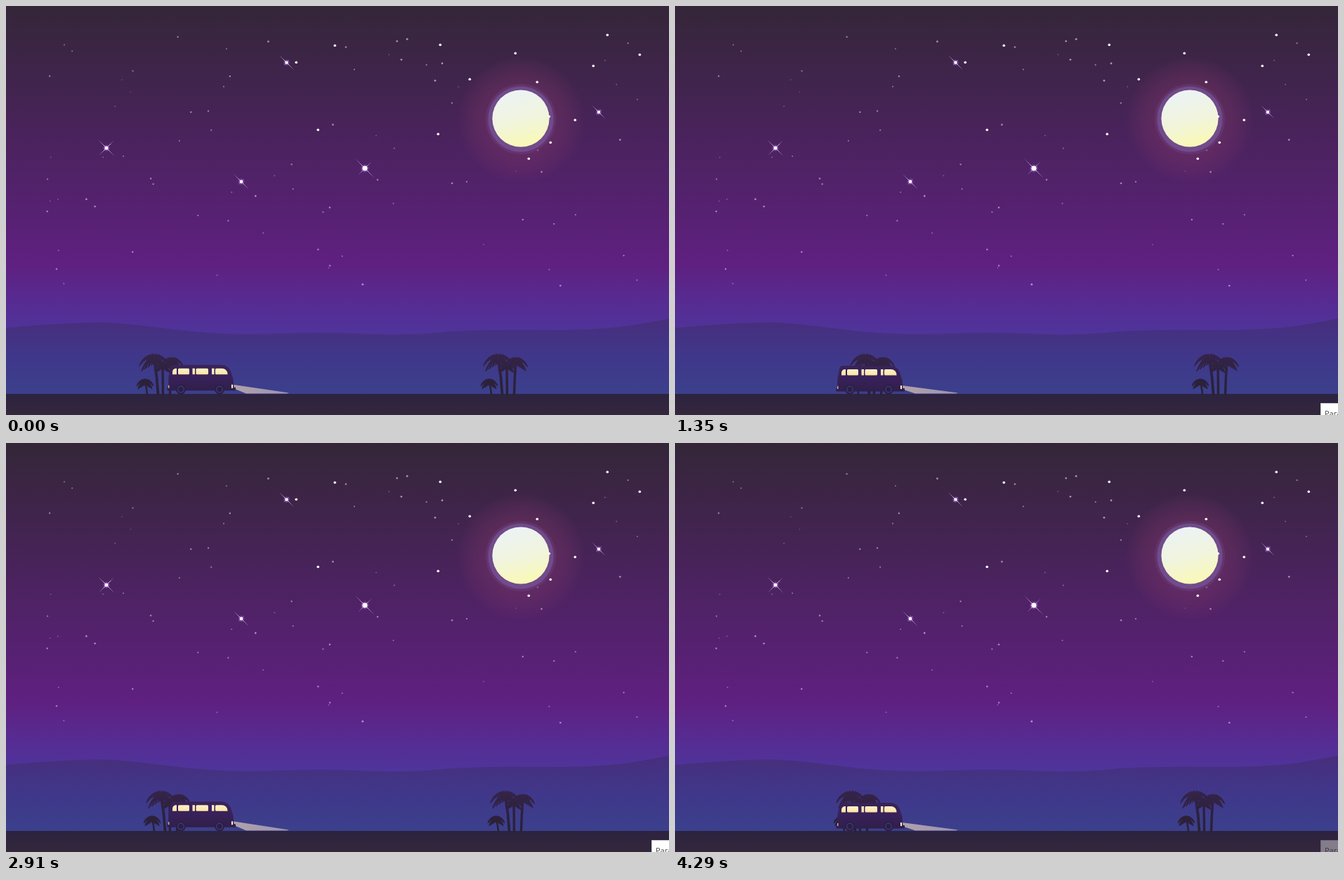
These frames come from a looping animation (944x582 px, 4370 ms). An HTML page with a canvas:

```html
<!DOCTYPE html>
<html lang="en">
<head>
<meta charset="utf-8">
<title>Night drive</title>
<style>
html, body { margin: 0; width: 100%; height: 100%; overflow: hidden; background: #30253d; }
#scene { position: relative; width: 100%; height: 100%; overflow: hidden; contain: strict; }
canvas { display: block; }
#tip {
  position: absolute; left: 919px; top: 565px; right: 0; bottom: 0; overflow: hidden;
  box-sizing: border-box; padding: 6px 0 0 5px; visibility: hidden;
  background: #fff; border: solid #d0d0d0; border-width: 1px 0 0 1px; color: #4a4a4a;
  font: 11px/16px "Open Sans", "Noto Sans", sans-serif;
}
</style>
</head>
<body>
<div id="scene">
  <canvas id="stage" width="944" height="582"></canvas>
  <div id="tip">Parar</div>
</div>
<script>
const W = 944, H = 582, ROAD = 552;
const LOOP = 4370, GAP = 490, SPEED = 1 / 3;

// Times at which the picture changes, on a 10 ms clock
const ramp = (from, to, count) => Array.from({ length: count },
  (_, i) => Math.ceil((from + (to - from) * (i + 1) / count) / 10) * 10);
const steps = [0, 70, ...ramp(70, 590, 7), ...ramp(590, 4290, 48)];

const bright = [[468, 56], [413, 80], [618, 55], [725, 67], [856, 41], [902, 69], [836, 85],
  [660, 104], [756, 108], [810, 162], [775, 194], [744, 217], [615, 182], [444, 176], [773, 157]];
const hill = [[0, 458], [120, 448], [190, 454], [260, 463], [330, 468], [450, 464],
  [570, 469], [665, 460], [850, 462], [950, 444]];

function layer(w, h, paint) {
  const c = document.createElement('canvas');
  c.width = w;
  c.height = h;
  paint(c.getContext('2d'));
  return c;
}

function randomizer(seed) {
  return () => (seed = seed * 16807 % 2147483647) / 2147483647;
}

// Linear gradient between two points, colours evenly spaced
function blend(g, x0, y0, x1, y1, ...colours) {
  const grad = g.createLinearGradient(x0, y0, x1, y1);
  colours.forEach((c, i) => grad.addColorStop(i / (colours.length - 1), c));
  return grad;
}

function disc(g, x, y, r, fill) {
  g.fillStyle = fill;
  g.beginPath();
  g.arc(x, y, r, 0, 7);
  g.fill();
}

function box(g, x, y, w, h, radii, fill) {
  g.fillStyle = fill;
  g.beginPath();
  g.roundRect(x, y, w, h, radii);
  g.fill();
}

function sparkle(g, x, y, size, cross, core) {
  const ray = (len, dy) => {
    const ends = [x - len, y - len * dy, x + len, y + len * dy];
    g.strokeStyle = blend(g, ...ends, 'rgba(180,120,220,.2)', '#fff', 'rgba(180,120,220,.2)');
    g.lineWidth = 1;
    g.beginPath();
    g.moveTo(ends[0], ends[1]);
    g.lineTo(ends[2], ends[3]);
    g.stroke();
  };
  disc(g, x, y, core + 2, 'rgba(150,80,200,.5)');
  ray(size, 1);
  ray(cross, -1);
  disc(g, x, y, core, '#fff');
}

function drawStars(g) {
  const rnd = randomizer(77);
  for (let i = 0; i < 86; i++) {
    const glow = rnd();
    disc(g, 55 + rnd() * 855, 40 + rnd() * 358, .8 + glow * .6, `rgba(210,182,220,${.35 + glow * .4})`);
  }
}

function drawMoon(g) {
  const halo = g.createRadialGradient(733, 162, 40, 733, 162, 91);
  for (let p = 0; p <= 1; p += .125) halo.addColorStop(p, `rgba(125,52,102,${.44 * (1 - p ** 1.6)})`);
  disc(g, 733, 162, 91, halo);
  disc(g, 733, 161, 50, 'rgba(115,80,150,.25)');
  disc(g, 733, 161, 46.5, 'rgba(125,95,165,.55)');
  disc(g, 733, 160, 40.6, blend(g, 722, 120, 742, 201, '#ecf3f5', '#f0f4de', '#faf9b4'));
}

function drawHills(g) {
  g.beginPath();
  g.moveTo(...hill[0]);
  for (let i = 1; i < hill.length - 1; i++) {
    const [x, y] = hill[i], [nx, ny] = hill[i + 1];
    g.quadraticCurveTo(x, y, (x + nx) / 2, (y + ny) / 2);
  }
  g.lineTo(...hill.at(-1));
  g.lineTo(W, ROAD);
  g.lineTo(0, ROAD);
  g.fillStyle = blend(g, 0, 446, 0, ROAD, '#472e7c', '#40378a', '#3b408c');
  g.fill();
}

function drawBackdrop(g) {
  g.fillStyle = blend(g, 0, 0, 0, 367, '#342638', '#5f2080');
  g.fillRect(0, 0, W, 367);
  g.fillStyle = blend(g, 0, 367, 0, 470, '#5f2080', '#572b91', '#4e359c');
  g.fillRect(0, 367, W, 110);
  drawStars(g);
  drawMoon(g);
  for (const [x, y] of bright) disc(g, x + .3, y + .3, 1.8, '#fff');
  sparkle(g, 143, 202, 11, 10, 2.6);
  sparkle(g, 511, 231, 13, 9, 3.6);
  sparkle(g, 335, 250, 10, 4, 2.4);
  sparkle(g, 399.5, 80.5, 10, 4, 2.2);
  sparkle(g, 844, 151, 9, 4, 2.2);
  drawHills(g);
  g.fillStyle = blend(g, 0, ROAD, 0, H, '#2e2340', '#32273b');
  g.fillRect(0, ROAD, W, H - ROAD);
}

// An arched rib with leaflets hanging from it
function frond(g, x, y, dx, dy, rise, leaf) {
  const cx = x + dx * .55, cy = y - rise;
  const at = (a, b, c, t) => a * (1 - t) ** 2 + 2 * b * t * (1 - t) + c * t * t;
  g.lineWidth = 2.4;
  g.beginPath();
  g.moveTo(x, y);
  g.quadraticCurveTo(cx, cy, x + dx, y + dy);
  g.stroke();
  g.lineWidth = 1.5;
  g.beginPath();
  for (let t = .15; t < 1; t += .14) {
    const px = at(x, cx, x + dx, t), py = at(y, cy, y + dy, t);
    g.moveTo(px, py);
    g.lineTo(px + Math.sign(dx) * leaf * .4, py + leaf * (1.1 - t * .5));
  }
  g.stroke();
}

function palm(g, x, y, size, foot, width) {
  g.lineWidth = width;
  g.beginPath();
  g.moveTo(x, y);
  g.quadraticCurveTo(x + (foot - x) * .8, (y + 58) / 2, foot, 58);
  g.stroke();
  for (let k = -.875; k < 1; k += .25) {
    frond(g, x, y, k * size, (.75 * k * k - .35) * size, size * .5, size * .24);
    frond(g, x, y, k * size * .85, (.15 + .5 * Math.abs(k)) * size, size * .25, size * .2);
  }
}

function drawPalms(g) {
  g.translate(4, 0);
  g.strokeStyle = blend(g, 0, 0, 0, 58, '#35244a', '#2d213c', '#2a2136');
  g.lineCap = 'round';
  palm(g, 37, 19, 12, 37.5, 3.4);
  palm(g, 50, 13, 17, 47.5, 3.4);
  palm(g, 25, 10, 22, 30.5, 3.8);
  palm(g, 12, 42, 12, 15, 2.6);
}

function wheel(g, x) {
  disc(g, x, 545.5, 7, '#2a1f46');
  g.strokeStyle = '#453a7a';
  g.lineWidth = 1.2;
  g.beginPath();
  g.arc(x, 545.5, 4.3, 0, 7);
  g.stroke();
}

function drawVan(g, bob) {
  g.fillStyle = blend(g, 323, 0, 403, 0, '#b3a1a8', '#a59bb0', '#9a92b2');
  g.fill(new Path2D(`M323 ${538 + bob}L403 550.5 400 551.5H342L323 ${543 + bob}Z`));

  g.save();
  g.translate(0, bob);
  g.fillStyle = blend(g, 0, 510, 0, 547, '#3a2358', '#38215a', '#2f1f49');
  g.fill(new Path2D('M239 510H306Q316 510 320 519L323.5 530 324.5 542H327V546.5H229.5V542H231L231.5 527 234 515Q235 510 239 510Z'));
  const glass = blend(g, 0, 515, 0, 524, '#fff1c6', '#fbe3a4');
  box(g, 237, 515, 6, 8.5, [5, 0, 0, 0], glass);
  box(g, 245, 515, 16, 8.5, 1.5, glass);
  box(g, 265.5, 515, 3.5, 8.5, 0, glass);
  box(g, 270.5, 515, 17.5, 8.5, 1.5, glass);
  box(g, 293, 515, 3.5, 8.5, 0, glass);
  box(g, 298, 515, 17.5, 8.5, [1.5, 8, 0, 1.5], glass);
  box(g, 231, 539, 1.5, 4, 0, '#d8a0a0');
  box(g, 321, 538, 2, 5, 0, '#fff0d0');
  g.restore();

  wheel(g, 249);
  wheel(g, 304);
}

const stage = document.getElementById('stage').getContext('2d');
const tip = document.getElementById('tip');
const backdrop = layer(W, H, drawBackdrop);
const palms = layer(78, 60, drawPalms);

function draw(t) {
  const x = Math.round((186 - t * SPEED + GAP * 4) % GAP);
  const bob = 1 + Math.cos((t / 1000 - .3) * 2 * Math.PI);
  stage.drawImage(backdrop, 0, 0);
  for (const shift of [-GAP, 0, GAP]) stage.drawImage(palms, x + shift - 4, 494);
  drawVan(stage, bob);
  tip.style.visibility = t >= 300 ? 'visible' : 'hidden';
  tip.style.opacity = t >= 4290 ? .4 : 1;
}

const start = performance.now();
let shown = -1;
function tick() {
  const now = (performance.now() - start) % LOOP;
  const t = steps.findLast(s => s <= now);
  if (t !== shown) draw(shown = t);
  requestAnimationFrame(tick);
}
tick();
</script>
</body>
</html>
```
